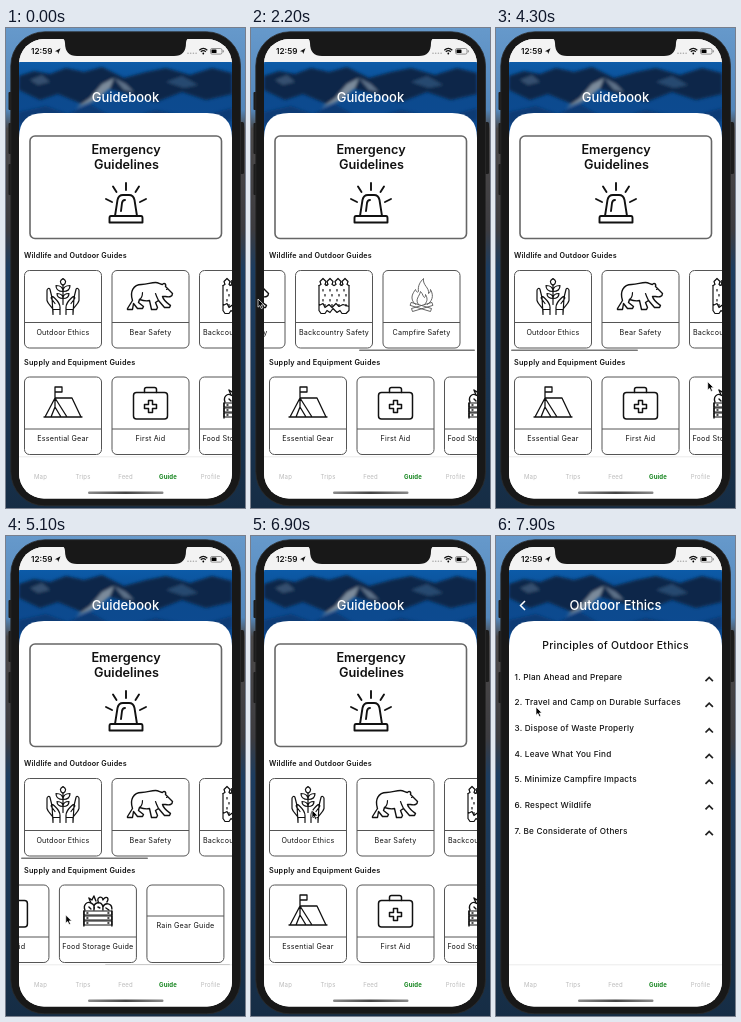
An HTML page that plays this animation: 239x480 px, repeating every 8000 ms.

```html
<!DOCTYPE html>
<html lang="en">
<head>
<meta charset="utf-8">
<title>Guidebook</title>
<style>
  html, body { margin: 0; width: 100%; height: 100%; overflow: hidden; background: #10233a; }
  svg { display: block; width: 100vw; height: 100vh; }
  text { font-family: Inter, "Open Sans", sans-serif; font-weight: 500; fill: #111; letter-spacing: .028em; }
  .mid { text-anchor: middle; }
  .title { letter-spacing: 0; }
  .line { fill: none; stroke: #111; stroke-width: 1.2; stroke-linecap: round; stroke-linejoin: round; }
  .card { fill: #fff; stroke: #555; stroke-width: 1; }
</style>
</head>
<body>
<svg id="stage" viewBox="0 0 239 480"></svg>
<script>
const LOOP = 8000;
const CARD_STEP = 87.5;
const MAX_SCROLL = 138;

const text = (x, y, size, str, attrs = '') =>
  `<text x="${x}" y="${y}" font-size="${size}" ${attrs}>${str}</text>`;
const centered = (x, y, size, str, attrs = '', kind = '') =>
  text(x, y, size, str, `class="mid ${kind}" ${attrs}`);
const path = (d, attrs = '') => `<path d="${d}" ${attrs}/>`;
const mirror = s => s + `<g transform="scale(-1 1)">${s}</g>`;

const trees = [-11, -4, 4, 11].map(x =>
  path(`M${x - 4} -11l2 -1l-1 -3l3 -3l3 3l-1 3l2 1`)).join('');
const dots = [...Array(16).keys()].map(i =>
  path(`M${-11 + (i % 4) * 7 + (i >> 2) % 2 * 2} ${-7 + (i >> 2) * 5}v1.5`)).join('');

const icons = {
  hands: path('M0 8V-12M0 -11c-4 -3 -3 -5 0 -7c3 2 4 4 0 7M0 -5c-5 0 -7 -2 -7 -6c5 0 7 2 7 6c0 -4 2 -6 7 -6c0 4 -2 6 -7 6M0 2c-4 0 -6 -2 -6 -5c4 0 6 2 6 5c0 -3 2 -5 6 -5c0 3 -2 5 -6 5') +
    mirror(path('M-3 18V11C-3 6 -6 4 -9 1C-11 -1 -13 1 -11 3L-8 7M-11 1L-13 -7C-13.5 -9 -16 -8 -16 -6V4C-15 8 -11 10 -10 13V18zM-10 13H-3')),
  bear: path('M-23 12L-18 4C-21 -5 -17 -12 -9 -12C-3 -12 0 -14 5 -14C8 -14 10 -12 12 -12C13 -14 16 -13 15 -10L22 -3C22 0 19 1 15 0L12 0C13 4 16 6 20 9L19 11H14L8 4L5 6L7 11L6 13H1L-1 4C-5 5 -8 4 -11 3L-12 6L-7 10L-8 12H-13L-17 7L-18 13H-23z', 'stroke-width="1.4"') +
    path('M-11 3C-8 1 -8 -2 -8 -4M8 4C7 2 6 0 5 -3M16 -7h.5'),
  woods: trees + path('M-15 -11V14M15 -11V14M-15 14l2 3h4l2 -3l3 2l3 -4l4 4l3 -2l2 3h4l3 -3M-15 9l4 -2l2 4l4 -3l3 3l4 -4l3 3l4 -2l6 2') + dots,
  fire: `<g stroke="#555" stroke-width=".9">${path('M-6 8C-13 2 -8 -4 -6 -7C-5 -4 -4 -4 -3 -5C-4 -11 -1 -15 2 -18C1 -11 8 -9 7 -3C9 -4 9 -6 9 -7C13 0 10 5 6 8M-3 8C-7 3 -2 0 -1 -5C2 -2 1 0 3 1C4 0 4 -1 4 -2C7 3 5 6 3 8')}${mirror(path('M-11 9l20 6l1 -3l-20 -6z'))}</g>`,
  tent: path('M-18 14L-8 -5L4 14M-12 14L-8 4L-2 14M-8 -5H9L18 14M-19 14H19M-8 -5V-16h7v5h-7M-8 -5V4', 'stroke-width="1.3"'),
  aid: `<g stroke-width="1.5"><rect x="-17" y="-10.5" width="34" height="26.5" rx="3"/>
    ${path('M-6 -10.5v-3q0 -2 2 -2h8q2 0 2 2v3M-2 -2.5h4v4h4v4h-4v4h-4v-4h-4v-4h4z')}</g>`,
  crate: [0, 5, 10].map(y => path(`M-14 ${y}h28v4h-28z`)).join('') +
    path('M-14 0V15M14 0V15M-11 2h1M10 2h1M-11 7h1M10 7h1M-11 12h1M10 12h1M-13 -1c-2 -5 2 -9 6 -7c3 1 4 4 3 7M-4 -2c-1 -7 8 -9 9 -2v3M5 -4c2 -5 9 -4 9 2M-7 -8l-2 -5l3 2l2 -4l2 5M1 -8c-4 -6 4 -8 4 -3c3 -5 7 -2 4 2M8 -3l3 2M-9 -4l2 2M0 -4l2 1', 'stroke-width="1.4"'),
};

function card(i, top, [label, icon]) {
  const x = 18.5 + i * CARD_STEP, split = icon ? 52 : 31;
  return `<g transform="translate(${x} ${top})">
    <rect class="card" width="77" height="77.5" rx="5"/>
    ${path(`M0 ${split}H77`, 'stroke="#555"')}
    ${icon ? `<g class="line" transform="translate(38.5 26)">${icons[icon]}</g>` : ''}
    ${centered(38.5, split + 12, 7.2, label, 'style="font-weight:400"')}</g>`;
}

const row = (id, top, cards) =>
  `<g id="${id}">${cards.map((c, i) => card(i, top, c)).join('')}</g>
   <rect id="${id}Bar" y="${top + 79}" height="1.6" rx=".8" fill="#777"/>`;

const photo = `<g clip-path="url(#photoClip)"><rect x="13" y="34" width="213" height="80" fill="url(#sky)"/>
  <g filter="url(#soft)">
    ${path('M13 48L28 43L44 46L60 40L78 44L96 39L118 50L140 44L160 40L184 47L206 40L226 45V66L200 72L176 64L150 74L122 66L100 60L76 76L52 66L34 72L13 62z', 'fill="#0d2848"')}
    ${path('M13 84L40 78L62 86L84 76L112 92L150 82L190 90L226 80V92L180 100H60L13 96z', 'fill="#0c3a74"')}
    ${path('M70 80L84 70L96 56L108 50L104 60L90 72z', 'fill="#7c8b9b"')}
    ${path('M108 50L120 56L128 64L118 62z', 'fill="#5d7188"')}
    ${path('M24 52L36 47L44 54L32 57z', 'fill="#35506f"')}
    ${path('M160 54L176 48L192 57L178 60z', 'fill="#27486f"')}
  </g></g>`;

const page = (id, title, body) => `<g id="${id}">
  <rect x="13" y="34" width="213" height="400" fill="#fff"/>${photo}
  ${path('M13 432V110Q13 85 38 85H201Q226 85 226 110V432z', 'fill="#fff"')}
  ${centered(119.5, 74, 13, title, 'style="fill:#fff"', 'title')}${body}</g>`;

const siren = `<g class="line" transform="translate(120 175)" style="stroke-width:1.9">
  ${path('M-11 13L-8.5 -3Q-7.5 -8 -3 -8H3Q7.5 -8 8.5 -3L11 13M-15 13H15Q16.5 13 16.5 15V19.5H-16.5V15Q-16.5 13 -15 13zM-5 8L-4 0Q-3.5 -3 -1 -3M0 -13V-20M-9.5 -11L-13 -16.5M9.5 -11L13 -16.5M-14 -1L-20 -4M14 -1L20 -4')}</g>`;

const home = page('home', 'Guidebook', `
  <rect x="24" y="108" width="191.5" height="102.5" rx="5" fill="#fff" stroke="#666" stroke-width="1.6"/>
  ${centered(120, 126, 12.7, 'Emergency', 'style="font-weight:600"', 'title')}
  ${centered(120.5, 140.5, 12.7, 'Guidelines', 'style="font-weight:600"', 'title')}${siren}
  ${text(18, 230.3, 7.2, 'Wildlife and Outdoor Guides', 'style="font-weight:600"')}
  ${row('wild', 242.5, [['Outdoor Ethics', 'hands'], ['Bear Safety', 'bear'], ['Backcountry Safety', 'woods'], ['Campfire Safety', 'fire']])}
  ${text(18, 337, 7.3, 'Supply and Equipment Guides', 'style="font-weight:600"')}
  ${row('gear', 349, [['Essential Gear', 'tent'], ['First Aid', 'aid'], ['Food Storage Guide', 'crate'], ['Rain Gear Guide', '']])}`);

const principles = ['Plan Ahead and Prepare', 'Travel and Camp on Durable Surfaces', 'Dispose of Waste Properly',
  'Leave What You Find', 'Minimize Campfire Impacts', 'Respect Wildlife', 'Be Considerate of Others'];

const detail = page('detail', 'Outdoor Ethics', `
  ${path('M29 65L24.5 69.5L29 74', 'fill="none" stroke="#fff" stroke-width="1.5"')}
  ${centered(119.5, 112.5, 10.4, 'Principles of Outdoor Ethics')}
  ${principles.map((p, i) => {
    const y = 143.7 + i * 25.65;
    return text(18.5, y, 8.2, `${i + 1}. ${p}`) +
      path(`M209.5 ${y + 1.5}l3.7 -3.7l3.7 3.7`, 'fill="none" stroke="#222" stroke-width="1.7"');
  }).join('')}`);

const tabs = ['Map', 'Trips', 'Feed', 'Guide', 'Profile'].map((name, i) =>
  centered(34.5 + i * 42.5, 451.3, 6, name,
    `style="${name === 'Guide' ? 'fill:#14851e;font-weight:700' : 'fill:#bbb;font-weight:400'}"`)).join('');

const statusBar = `
  <rect x="13" y="11" width="213" height="23" fill="#f3f3f3"/>
  ${path('M56 10H183Q180 11 180 15Q180 28 168 28H71Q59 28 59 15Q59 11 56 10z', 'fill="#181818"')}
  ${text(25, 26, 8.2, '12:59', 'class="title" style="font-weight:600"')}
  ${path('M49 23.3L54.5 20.3L52.2 26L51.5 23.8z', 'fill="#111"')}
  ${[182, 184.7, 187.4, 190.1].map(x => `<circle cx="${x}" cy="25.3" r=".8" fill="#aaa"/>`).join('')}
  ${path('M193.3 22.2Q197.3 18.5 201.3 22.2M194.8 23.8Q197.3 21.6 199.8 23.8', 'fill="none" stroke="#111" stroke-width="1.2"')}
  <circle cx="197.3" cy="25.5" r=".9"/>
  <rect x="204.5" y="20.5" width="11.5" height="5.6" rx="1.6" fill="none" stroke="#777" stroke-width=".8"/>
  <rect x="205.5" y="21.5" width="5" height="3.6" rx=".6"/><rect x="216.8" y="22.3" width=".9" height="2" fill="#777"/>`;

document.getElementById('stage').innerHTML = `
  <defs>
    <linearGradient id="sky" x2="0" y2="1"><stop stop-color="#0c5ba8"/><stop offset=".4" stop-color="#0c4a8e"/><stop offset="1" stop-color="#0d4a92"/></linearGradient>
    <linearGradient id="wall" x2="0" y2="1"><stop stop-color="#6699cb"/><stop offset=".17" stop-color="#5487bb"/><stop offset=".21" stop-color="#4c4a4a"/><stop offset=".42" stop-color="#3d3c40"/><stop offset=".5" stop-color="#1d3d60"/><stop offset="1" stop-color="#162d45"/></linearGradient>
    <linearGradient id="handle"><stop stop-color="#8a8a8a"/><stop offset=".5" stop-color="#444"/><stop offset="1" stop-color="#8a8a8a"/></linearGradient>
    <filter id="soft"><feGaussianBlur stdDeviation="1.5"/></filter>
    <clipPath id="photoClip"><rect x="13" y="34" width="213" height="80"/></clipPath>
    <clipPath id="screen"><rect x="13" y="11" width="213" height="459.5" rx="25"/></clipPath>
  </defs>
  <rect width="239" height="480" fill="url(#wall)"/>
  <rect x="233" y="94" width="5" height="52" rx="1.5" fill="#1c1c1c"/>
  ${[[64, 18], [95, 31], [136, 31]].map(([y, h]) => `<rect x="2.5" y="${y}" width="4" height="${h}" rx="1" fill="#1c1c1c"/>`).join('')}
  <rect x="4.8" y="3.8" width="229.7" height="474" rx="34" fill="#181818" stroke="#2b2b2b" stroke-width=".8"/>
  <g clip-path="url(#screen)">
    <rect x="13" y="11" width="213" height="460" fill="#fff"/>
    ${home}<rect id="shade" x="13" y="34" width="213" height="398"/>${detail}
    <rect x="13" y="428.5" width="213" height="43" fill="#fff"/>
    ${path('M13 428.8H226', 'stroke="#ddd" stroke-width=".6"')}${tabs}
    <rect x="82" y="463.6" width="75.5" height="2.4" rx="1.2" fill="url(#handle)"/>
    ${statusBar}
  </g>
  ${path('M0 0V8.2L1.9 6.5L3.3 9.6L4.8 8.9L3.4 5.9H6z', 'id="cursor" fill="#000" stroke="#fff" stroke-width=".7"')}`;

const $ = id => document.getElementById(id);
const mix = (a, b, k) => a + (b - a) * k;
const smooth = k => k * k * (3 - 2 * k);

// Eased value at time t along [time, value] keys.
function at(t, keys) {
  if (t <= keys[0][0]) return keys[0][1];
  const i = keys.findIndex(k => k[0] > t);
  if (i < 0) return keys[keys.length - 1][1];
  const [t0, a] = keys[i - 1], [t1, b] = keys[i];
  return mix(a, b, smooth((t - t0) / (t1 - t0)));
}

const scrolls = {
  wild: [[1620, 0], [2150, 149], [2450, 149], [2750, 138], [2880, 138], [3350, -11], [3950, -11], [4300, 0]],
  gear: [[4600, 0], [5080, 140], [5350, 145], [5600, 138], [5750, 138], [6150, -9], [6300, -9], [6550, 0]],
};
const barFades = {
  wild: [[1620, 0], [1750, 1], [5100, 1], [5400, 0]],
  gear: [[4600, 0], [4720, 1], [6550, 1], [6850, 0]],
};
const cursorX = [[800, 250], [1400, 204], [1620, 204], [2150, 7], [2450, 7], [2860, 78], [3350, 237], [3950, 237],
  [4500, 201], [4600, 201], [5080, 60], [5350, 46], [5720, 70], [6150, 215], [6300, 215], [6850, 61], [7380, 61], [7850, 40]];
const cursorY = [[800, 290], [1400, 271], [2450, 271], [3350, 292], [3950, 292], [4500, 380], [5080, 379], [6300, 380],
  [6850, 274], [7380, 274], [7850, 171]];

function drawRow(id, t) {
  const scroll = at(t, scrolls[id]);
  const inside = Math.min(MAX_SCROLL, Math.max(0, scroll));
  const length = 127 - Math.abs(scroll - inside);
  $(id).setAttribute('transform', `translate(${-scroll} 0)`);
  const bar = $(id + 'Bar');
  bar.setAttribute('x', 15 + inside / MAX_SCROLL * (209 - length));
  bar.setAttribute('width', length);
  bar.setAttribute('opacity', at(t, barFades[id]));
}

function draw(t) {
  drawRow('wild', t);
  drawRow('gear', t);
  const k = Math.min(1, Math.max(0, (t - 7300) / 450));
  const push = 1 - (1 - k) ** 3;
  $('home').setAttribute('transform', `translate(${-64 * push} 0)`);
  $('detail').setAttribute('transform', `translate(${214 * (1 - push)} 0)`);
  $('shade').setAttribute('opacity', 0.08 * push);
  $('cursor').setAttribute('transform', `translate(${at(t, cursorX)} ${at(t, cursorY)})`);
}

const start = performance.now();
function tick() {
  draw((performance.now() - start) % LOOP);
  requestAnimationFrame(tick);
}
tick();
</script>
</body>
</html>
```
